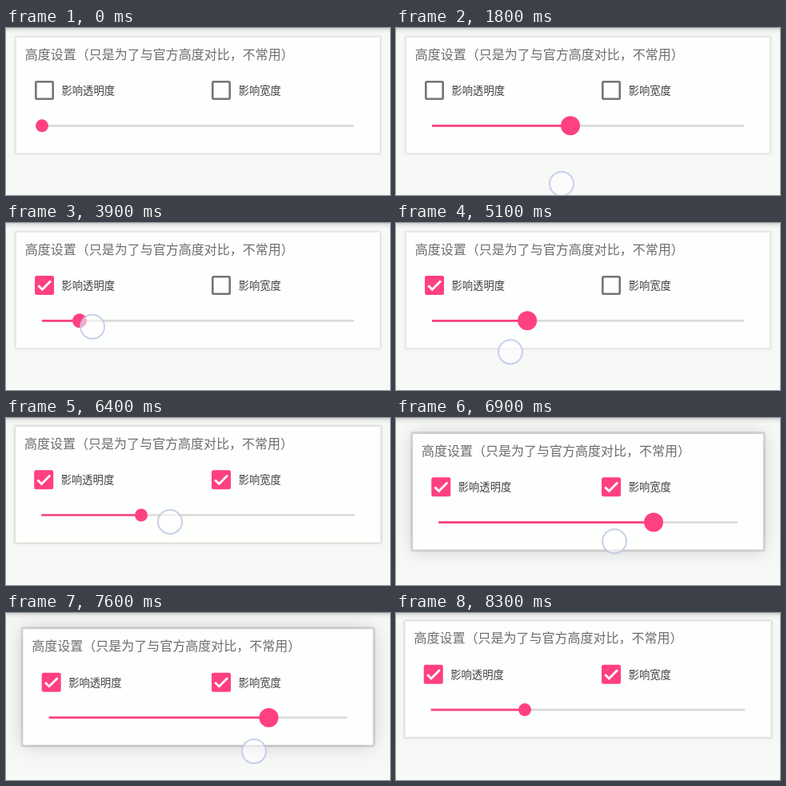
These frames come from a looping animation (480x209 px, 8.7 s). An HTML page with a canvas:

```html
<!DOCTYPE html>
<html lang="zh-CN">
<head>
<meta charset="utf-8">
<title>高度设置</title>
<style>
  html, body { margin: 0; width: 100%; height: 100%; overflow: hidden; background: #f7f9f7; }
  canvas { display: block; }
</style>
</head>
<body>
<canvas id="stage" width="480" height="209"></canvas>
<script>
const ctx = document.getElementById('stage').getContext('2d');
const LOOP = 8700, STEP = 100;
const LAG = 100; // the thumb trails the finger
const PINK = '#ff4081', PAPER = '#fdfffc';
const FONT = '"Noto Sans CJK SC", "Noto Sans CJK", sans-serif';
const LEFT = 45, RIGHT = 435, ROW = 78, COL = [48, 269];

// path holds [time, x] turning points; y slides down from top by drop
const DRAGS = [
  { top: 126, drop: 81, path: [[1000, 54], [1500, 240], [1800, 207], [2300, 20]] },
  { top: 120, drop: 42, path: [[3700, 76], [3900, 108], [4400, 291], [5100, 143], [5300, 170]] },
  { top: 124, drop: 52, path: [[6300, 169], [6400, 205], [6700, 371], [6900, 273],
                               [7400, 347], [7600, 310], [8000, 161]] }
];
const TAPS = [2600, 5600];

const clamp = x => Math.max(0, Math.min(1, x));
const easeOut = u => 1 - (1 - u) ** 2;
const start = d => d.path[0][0];
const end = d => d.path[d.path.length - 1][0];

function fingerX({ path }, t) {
  const k = path.findIndex(p => p[0] >= t);
  if (k < 0) return path[path.length - 1][1];
  if (k === 0) return path[0][1];
  const [t0, x0] = path[k - 1], [t1, x1] = path[k];
  return x0 + (x1 - x0) * (t - t0) / (t1 - t0);
}

function finger(t) {
  const d = DRAGS.find(d => t >= start(d) && t <= end(d));
  if (d) {
    const u = (t - start(d)) / (end(d) - start(d));
    return [fingerX(d, t), d.top + d.drop * easeOut(u)];
  }
  const tap = TAPS.findIndex(s => t >= s && t < s + 100);
  return tap < 0 ? null : [COL[tap], ROW];
}

function thumbX(t) {
  const past = DRAGS.filter(d => start(d) <= t - LAG);
  return past.length ? fingerX(past[past.length - 1], t - LAG) : LEFT;
}

function thumbRadius(t) {
  return DRAGS.reduce((r, d) =>
    r + 4 * (clamp((t - start(d) - 150) / 200) - clamp((t - end(d)) / 150)), 8);
}

// the inset depends on the value and the value on the inset: iterate
function layout(x, wide) {
  let v = 0, inset = 0;
  for (let i = 0; i < 5; i++) {
    inset = wide ? 22.6 * v - 8 : 0;
    v = clamp((x - LEFT - inset) / (RIGHT - LEFT - 2 * inset));
  }
  return { v, inset };
}

function box(x, y, w, h, r, color) {
  ctx.fillStyle = color;
  ctx.beginPath();
  ctx.roundRect(x, y, w, h, r);
  ctx.fill();
}

function disc(x, y, r, color) {
  ctx.fillStyle = color;
  ctx.beginPath();
  ctx.arc(x, y, r, 0, 7);
  ctx.fill();
}

function line(points, width, color) {
  ctx.strokeStyle = color;
  ctx.lineWidth = width;
  ctx.beginPath();
  points.forEach(([x, y]) => ctx.lineTo(x, y));
  ctx.stroke();
}

function text(str, x, y, size, color) {
  ctx.font = `${size}px ${FONT}`;
  ctx.fillStyle = color;
  ctx.fillText(str, x, y);
}

function background() {
  ctx.fillStyle = '#f7f9f7';
  ctx.fillRect(0, 0, 480, 209);
  const g = ctx.createLinearGradient(0, 0, 0, 7);
  g.addColorStop(0, 'rgba(0,0,0,.18)');
  g.addColorStop(.4, 'rgba(0,0,0,.06)');
  g.addColorStop(1, 'rgba(0,0,0,0)');
  ctx.fillStyle = g;
  ctx.fillRect(0, 0, 480, 7);
}

function card(o, lift) {
  const x = 12.8 + o, y = 11.7 + o, w = 454.4 - 2 * o, h = 144.6;
  ctx.save();
  ctx.shadowColor = `rgba(0,0,0,${.03 + .2 * lift})`;
  ctx.shadowBlur = 3 + 25 * lift;
  box(x, y, w, h, 1, PAPER);
  ctx.restore();
  const rim = 2.2 + lift;
  box(x - rim, y - rim, w + 2 * rim, h + 2 * rim, rim, `rgba(0,0,0,${.06 + .06 * lift})`);
  box(x, y, w, h, 1, PAPER);
}

function checkbox(x, y, p) {
  const fill = clamp(p * 2), mark = clamp(p * 2 - 1);
  box(x - 12, y - 12, 24, 24, 2.5, p > 0 ? PINK : '#757575');
  const inner = 9.4 * (1 - fill);
  if (inner > 0) box(x - inner, y - inner, 2 * inner, 2 * inner, .5, PAPER);
  if (mark > 0) {
    const at = (dx, dy) => [x + dx * mark, y + dy * mark];
    line([at(-7.7, .2), at(-2.7, 5.2), at(8, -5.5)], 2.8, '#fff');
  }
}

function slider(o, v, r) {
  const y = 122.3 + o, a = LEFT + o, b = RIGHT - o, x = a + (b - a) * v;
  line([[a, y], [b, y]], 2.7, '#dadbda');
  line([[a, y], [x, y]], 2.7, '#fb4183');
  disc(x, y, r, PINK);
}

function touch([x, y]) {
  disc(x, y, 15, 'rgba(255,255,255,.55)');
  ctx.strokeStyle = 'rgba(190,195,228,.8)';
  ctx.lineWidth = 2;
  ctx.stroke();
}

function draw(t) {
  const wide = t > TAPS[1];
  const { v, inset: o } = layout(thumbX(t), wide);
  const ticked = i => clamp((t - TAPS[i] - 50) / 400);
  background();
  card(o, wide ? clamp((v - .2) * 1.5) : .04);
  text('高度设置（只是为了与官方高度对比，不常用）', 23.7 + o, 38.7 + o, 16, '#6c6c6c');
  checkbox(COL[0] + o, ROW + o, ticked(0));
  checkbox(COL[1], ROW + o, ticked(1));
  text('影响透明度', 69.5 + o, 83.1 + o, 13.3, '#404040');
  text('影响宽度', 290.7, 83.1 + o, 13.3, '#404040');
  slider(o, v, thumbRadius(t));
  const spot = finger(t);
  if (spot) touch(spot);
}

function frame() {
  const t = performance.now() % LOOP;
  draw(Math.floor(t / STEP) * STEP);
  requestAnimationFrame(frame);
}
frame();
</script>
</body>
</html>
```
